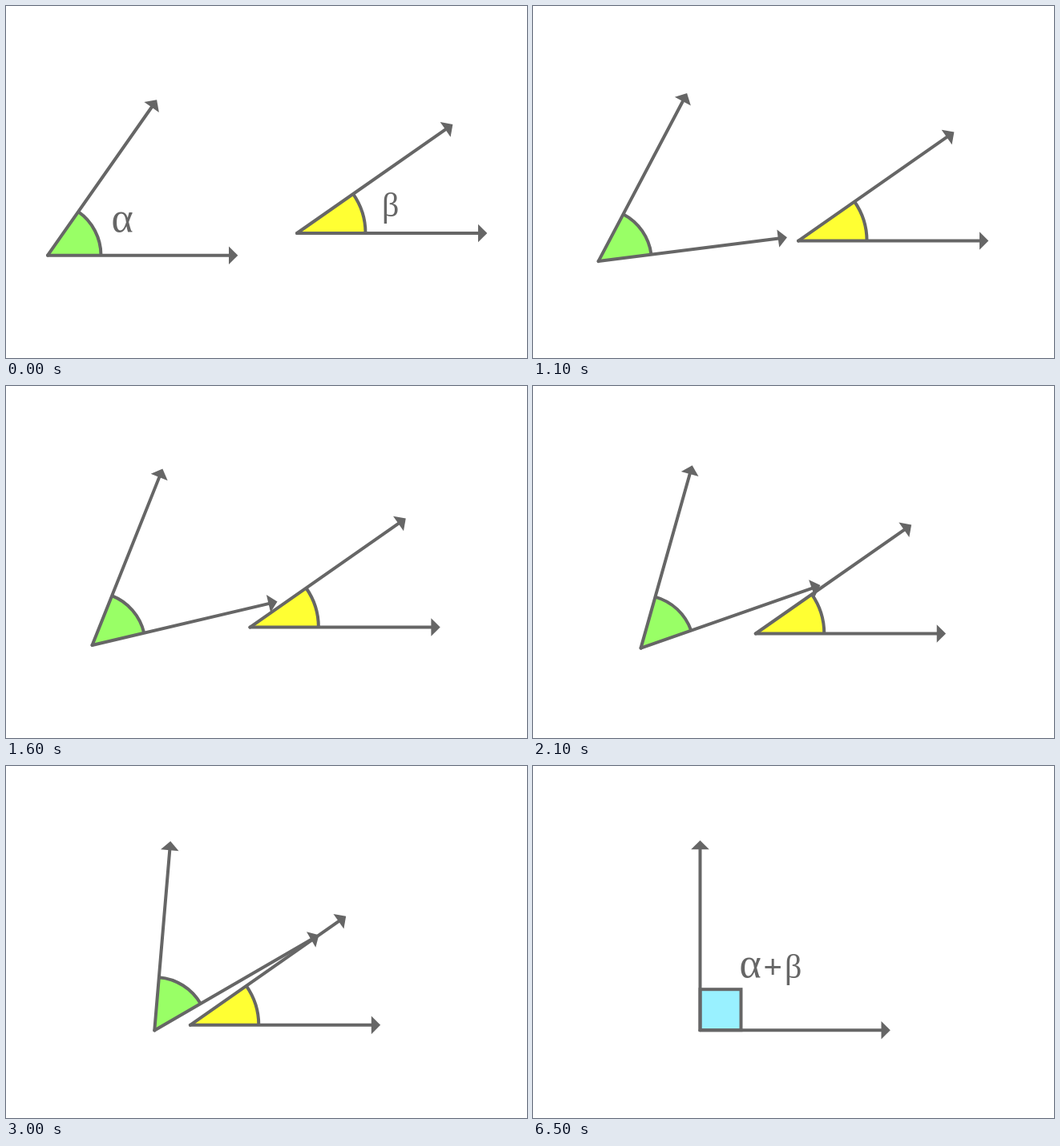
An HTML page with a canvas that plays this animation: 650 px wide and 440 px high, repeating every 8000 ms.

```html
<!DOCTYPE html>
<html lang="en">
<head>
<meta charset="utf-8">
<title>Complementary angles</title>
<style>
  html, body { margin: 0; width: 100%; height: 100%; overflow: hidden; background: #fff; }
  canvas { display: block; }
</style>
</head>
<body>
<canvas id="stage" width="650" height="440"></canvas>
<script>
const ctx = document.getElementById('stage').getContext('2d');
const LOOP = 8000, STEP = 100, STEPS = 29;
const MOVE = 500, JOINED = 3500, SUM = 6500;
const INK = '#666666', GREEN = '#99ff66', YELLOW = '#ffff33', BLUE = '#99f1ff';
const ARM = 237.3, HEAD = 11.3;
const SERIF = '"Liberation Serif", serif', SANS = '"Liberation Sans", sans-serif';
const rad = deg => deg * Math.PI / 180;
const mix = (a, b, k) => a + (b - a) * k;

const corner = { x: 208.5, y: 330.2 };
const alphaStart = { x: 52, y: 311.7 };
const betaStart = { x: 363, y: 284 };
const pivot = { x: 118, y: -92 };
const TURN = 35;

function spin(p, deg) {
  const c = Math.cos(rad(deg)), s = Math.sin(rad(deg));
  return { x: p.x * c + p.y * s, y: p.y * c - p.x * s };
}

function arrow(deg) {
  ctx.save();
  ctx.rotate(-rad(deg));
  ctx.beginPath();
  ctx.moveTo(0, 0);
  ctx.lineTo(ARM - HEAD + 1, 0);
  ctx.stroke();
  ctx.beginPath();
  ctx.moveTo(ARM, 0);
  ctx.lineTo(ARM - HEAD, -HEAD);
  ctx.lineTo(ARM - HEAD, HEAD);
  ctx.fillStyle = INK;
  ctx.fill();
  ctx.restore();
}

function at(p, draw) {
  ctx.save();
  ctx.translate(p.x, p.y);
  draw();
  ctx.restore();
}

function angle(p, from, span, radius, color) {
  at(p, () => {
    const a = -rad(from), b = -rad(from + span);
    ctx.beginPath();
    ctx.moveTo(0, 0);
    ctx.arc(0, 0, radius, a, b, true);
    ctx.closePath();
    ctx.fillStyle = color;
    ctx.fill();
    ctx.beginPath();
    ctx.arc(0, 0, radius, a, b, true);
    ctx.lineCap = 'butt';
    ctx.stroke();
    ctx.lineCap = 'round';
    arrow(from);
    arrow(from + span);
  });
}

// Places a glyph by the centre of its ink.
function glyph(text, x, y, size, family) {
  ctx.font = size + 'px ' + family;
  ctx.fillStyle = INK;
  const m = ctx.measureText(text);
  ctx.fillText(text,
    x - (m.actualBoundingBoxRight - m.actualBoundingBoxLeft) / 2,
    y + (m.actualBoundingBoxAscent - m.actualBoundingBoxDescent) / 2);
}
const alpha = (x, y) => glyph('α', x, y, 52, SERIF);
const beta = (x, y) => glyph('β', x, y, 42, SERIF);

function drawAngles(k) {
  const turn = TURN * k;
  const endArm = spin(pivot, TURN), arm = spin(pivot, turn);
  const a = {
    x: mix(alphaStart.x + pivot.x, corner.x + endArm.x, k) - arm.x,
    y: mix(alphaStart.y + pivot.y, corner.y + endArm.y, k) - arm.y
  };
  const b = { x: mix(betaStart.x, corner.x, k), y: mix(betaStart.y, corner.y, k) };
  angle(a, turn, 55, 66.5, GREEN);
  angle(b, 0, 35, 85.5, YELLOW);
}

function drawSum() {
  at(corner, () => {
    ctx.fillStyle = BLUE;
    ctx.fillRect(0, -51, 51, 51);
    ctx.strokeRect(0, -51, 51, 51);
    arrow(0);
    arrow(90);
  });
  alpha(271.5, 251.5);
  glyph('+', 299, 250.5, 40, SANS);
  beta(325, 254);
}

function render(t) {
  ctx.fillStyle = '#fff';
  ctx.fillRect(0, 0, 650, 440);
  ctx.strokeStyle = INK;
  ctx.lineWidth = 4;
  ctx.lineCap = 'round';
  if (t >= SUM) return drawSum();
  const step = Math.floor((t - MOVE) / STEP);
  drawAngles(Math.min(STEPS, Math.max(0, step)) / STEPS);
  if (t < MOVE) {
    alpha(145.5, 269.5);
    beta(480, 252);
  } else if (t >= JOINED) {
    alpha(251.5, 243.5);
    beta(318, 299);
  }
}

const start = performance.now();
function tick() {
  render((performance.now() - start) % LOOP);
  requestAnimationFrame(tick);
}
tick();
</script>
</body>
</html>
```
